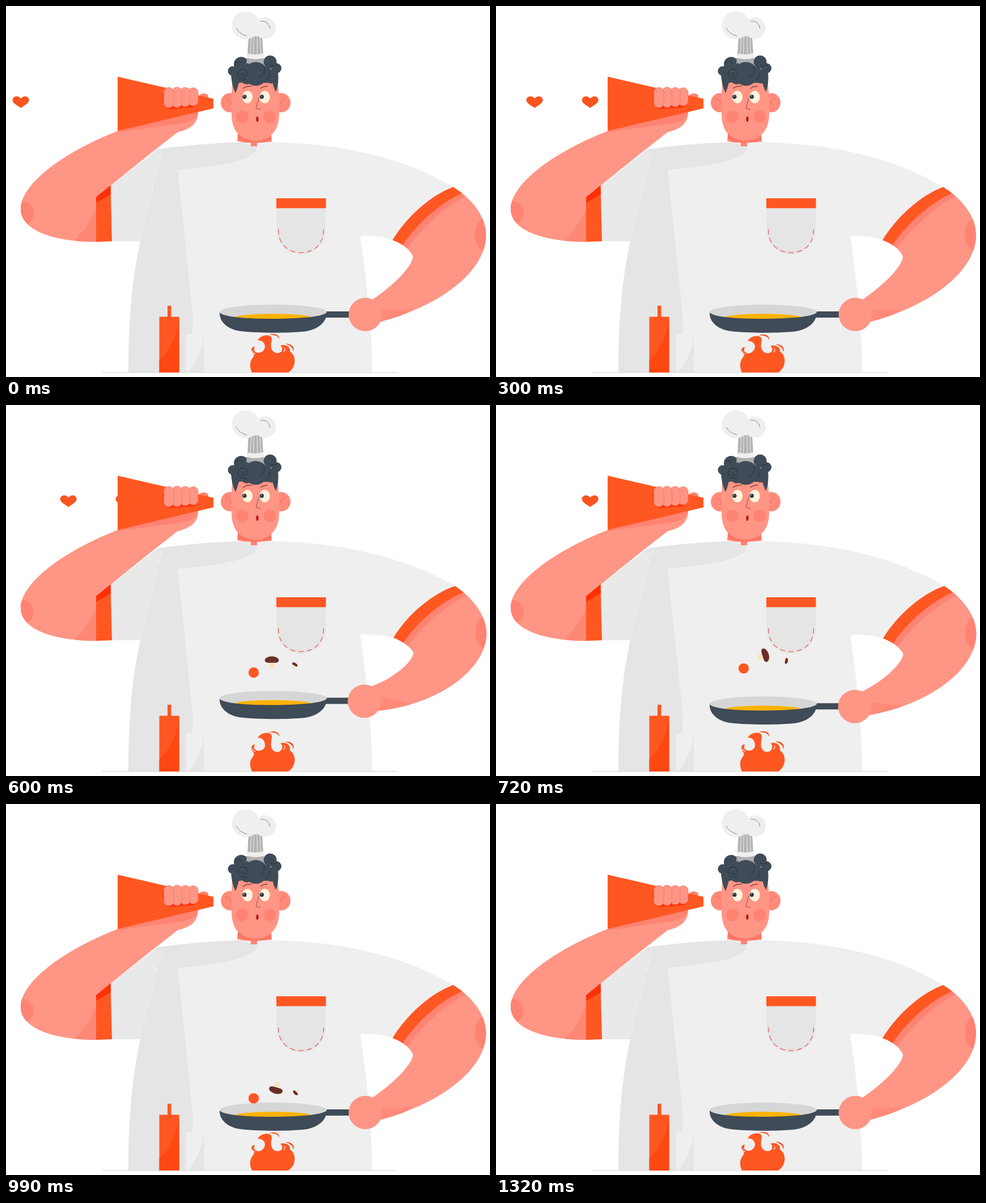
These frames come from a looping animation (854 px wide and 656 px high, 1350 ms). An HTML page with a canvas:

```html
<!DOCTYPE html>
<html lang="en">
<head>
<meta charset="utf-8">
<title>Cooking chef</title>
<style>
html, body { margin: 0; width: 100%; height: 100%; overflow: hidden; background: #fff; }
canvas { display: block; width: 854px; height: 656px; }
</style>
</head>
<body>
<canvas id="stage" width="854" height="656"></canvas>
<script>
const ctx = document.getElementById('stage').getContext('2d');
const LOOP = 1350, STEP = 30;
const ORANGE = '#ff5722', COAT = '#efefef', SHADE = '#e5e5e5', DARK = '#3f4b57';
const SKIN = '#ff9585', SKIN_SHADE = '#ff8373', EAR = '#ff8a79';

function fill(color, d) {
  ctx.fillStyle = color;
  ctx.fill(new Path2D(d));
}
function line(color, width, d, dash = []) {
  ctx.strokeStyle = color;
  ctx.lineWidth = width;
  ctx.setLineDash(dash);
  ctx.stroke(new Path2D(d));
  ctx.setLineDash([]);
}
function oval(color, x, y, rx, ry = rx) {
  ctx.fillStyle = color;
  ctx.beginPath();
  ctx.ellipse(x, y, rx, ry, 0, 0, Math.PI * 2);
  ctx.fill();
}
function box(color, x, y, w, h) {
  ctx.fillStyle = color;
  ctx.fillRect(x, y, w, h);
}
function clipped(d, draw) {
  ctx.save();
  ctx.clip(new Path2D(d));
  draw();
  ctx.restore();
}

const ease = u => (1 - Math.cos(Math.PI * Math.min(1, Math.max(0, u)))) / 2;

// Cubic curve through [time, value, slope] keys.
function follow(keys, t) {
  let i = 0;
  while (i < keys.length - 2 && t > keys[i + 1][0]) i++;
  const [t0, a, ma] = keys[i], [t1, b, mb] = keys[i + 1];
  const d = t1 - t0, u = Math.min(1, Math.max(0, (t - t0) / d)), v = 1 - u;
  return v * v * (1 + 2 * u) * a + u * u * (3 - 2 * u) * b + u * v * d * (v * ma - u * mb);
}
const TOSS = [[330, 590, -.3], [450, 533, -.55], [600, 473, -.17], [870, 487, .226], [1110, 557, .28], [1320, 595, 0]];
const SPIN = [[330, -240, 1.2], [450, -90, 1.3], [600, 90, .8], [870, 225, .45], [1110, 350, .53], [1320, 460, .5]];

function drawCoat(p) {
  fill(COAT, `M184 318 L268 253 C315 246 365 242 410 241 L468 241
    C588 242 703 268 ${789 + 4 * p} 320 L${682 + 2 * p} ${414 - 3 * p}
    C665 ${407 - p} 645 ${406 - p} 625 ${407 - p}
    C637 490 646 570 646 648 L216 648 C216 560 222 485 237 416 L187 416 Z`);
  fill('#e9e9e9', 'M184 318 L268 253 L276 253 L237 416 L187 416 Z');
  fill(SHADE, `M275 253 C320 246 365 243 410 241 L443 248 C443 275 375 282 303 290
    L331 562 L329 562 L329 580 L318 580 L318 648 L216 648 C216 560 222 485 237 416 Z`);
  fill(SHADE, 'M268 253 L276 252 L274 260 L262 259 Z');
  fill(SHADE, 'M349 583 C345 612 334 635 320 648 L349 648 Z');
  line('#f6f6f6', 1, 'M275 258 Q262 310 250 360 M600 262 Q613 335 624 404', [9, 7]);

  box('#e5e5e5', 477.5, 357, 86.5, 40);
  oval('#e5e5e5', 520.75, 396, 43.25, 43.5);
  box(ORANGE, 477, 340, 87.5, 17.5);
  line('#f0443a', 1.1, 'M480.5 395 C480.5 422 498 436 520.5 436 S560.5 422 560.5 395', [9, 6]);
}

function drawHead() {
  // hat
  fill('#b3b3b3', 'M428 52 L452 52 L454 88 L426 88 Z');
  line('#e4e4e4', 1.2, 'M433 54 L431 86 M437.5 54 L436.5 86 M443 54 L443.5 86 M448 54 L449.5 86');
  oval(COAT, 423, 34, 24.5);
  oval(COAT, 457, 39, 19);
  oval(COAT, 440, 44, 12, 10);
  line('#858585', 1, 'M406 39 Q411 49 425 53 M449 27 Q463 25 466 40');
  fill('#a9a9a9', 'M424 92 L455 92 L455 106 L424 106 Z');
  fill(COAT, 'M427 84 Q441 88 455 83 L456 92 Q441 97 426 92 Z');

  // neck
  fill(SKIN_SHADE, 'M410 215 L467 215 L469 240 L443 242 L443 248 L432 248 L432 242 Q419 242 408 239 Z');
  fill('#ff7262', 'M409 226 Q438 252 468 230 L468 236 Q440 247 409 235 Z');

  // ears and face
  oval(EAR, 395, 171, 16, 17);
  oval(EAR, 486, 171, 16, 17);
  line('#ef6658', 1, 'M387 164 Q396 164 397 174 M494 164 Q485 164 484 174');
  fill(SKIN, 'M400 120 L478 120 L482 160 L482 190 C482 224 463 237 440 237 C416 237 398 225 398 190 L398 155 Z');
  fill(DARK, 'M397 116 L414 116 Q412 137 405 154 Q397 138 397 116 M466 116 L480 116 Q482 138 476 152 Q470 140 466 116 Z');
  oval('#ff8373', 417, 196, 11);
  oval('#ff8373', 465, 196, 11);
  for (const x of [426, 456.5]) {
    oval('#fff3dc', x, 161, 9.2, 11);
    oval('#303b46', x - 5.2, 160.5, 3.7);
    oval('#ffffff', x - 6, 159, .8);
  }
  line('#6f3538', 1.2, 'M418 146 Q424 141 434 142 M449 146 Q455 141 462 142');
  line('#7c3d40', .8, 'M446 163 L441 181 L449 183');
  oval('#b71510', 443.5, 200, 2.1, 4.7);

  // curls
  oval(DARK, 415, 103, 13);
  oval(DARK, 400, 115, 8.5);
  oval(DARK, 411, 125, 11);
  oval(DARK, 425, 126, 12.5);
  oval(DARK, 441, 120, 21);
  oval(DARK, 458, 122, 14);
  oval(DARK, 468, 125, 12);
  oval(DARK, 477, 110, 9);
  oval(DARK, 466, 99, 11.5);
  line('#26313b', 1, `M425 130 Q412 130 409 120 Q412 108 423 113 Q430 121 421 125 Q414 122 419 118
    M455 105 Q459 121 447 126 M466 104 Q472 108 479 104 M404 100 Q412 96 417 101 M459 130 Q467 127 465 118`);
  // hat base between the curls
  fill('#b0b0b0', 'M425 92 Q440 96 455 92 L454 103 Q440 95 424 102 Z');
}

function drawLeftArm() {
  const arm = `M197 221 C98 260 25 316 26 360 C27 399 90 417 159 417 L159 339
    C215 292 262 255 303 223 C325 218 340 208 339 185 L300 165 Z`;
  fill(SKIN, arm);
  clipped(arm, () => {
    oval(SKIN_SHADE, 26, 366, 23, 22);
    fill('#ff8775', 'M159 358 C150 380 135 402 117 418 L159 418 Z');
    fill(SKIN_SHADE, 'M197 221 L339 186 C338 200 326 206 300 209 C270 213 230 218 200 223 Z');
  });
  fill(ORANGE, 'M159 339 L184.5 318 L187 416 L159 417 Z');
  fill('#ff2f06', 'M159 338 L184.5 317 L185 333 L159 348 Z');
}

function drawHorn() {
  oval(SKIN_SHADE, 349, 160, 8, 5.5);
  fill(ORANGE, 'M197 125 L366 164 L366 181 L197 221 Z');
  fill('#ff3208', 'M277 155 C275 177 283 184 293 182 L330 179 Q341 177 339 158 Z');
  for (const [x, y, h] of [[331, 160.5, 16], [317, 161, 17], [302.5, 161.5, 18], [288, 162, 18]]) {
    ctx.beginPath();
    ctx.roundRect(x - 9.5, y - h, 17.5, 2 * h, 8.7);
    ctx.fillStyle = SKIN;
    ctx.fill();
    ctx.strokeStyle = '#ff6f5c';
    ctx.lineWidth = .8;
    ctx.stroke();
  }
}

function heart(x) {
  ctx.save();
  ctx.translate(x, 170);
  fill('#f9541f', 'M.3 10.4 C-5 6 -14 3 -14.5 -3.5 C-14 -11.5 -4 -12.5 .3 -6.5 C5 -12.5 14 -11.5 14.7 -3.5 C14 3 5 6 .3 10.4 Z');
  ctx.restore();
}
function drawHearts(t) {
  for (const start of [0, 210, 420]) {
    const x = 26 + (t - start) * 14 / STEP;
    if (x >= 26 && x < 260) heart(x);
  }
}

function drawRightArm(p) {
  const fx = 634 - 2 * p, fy = 545.5 - 27.2 * p;
  const ex = 847 + p, ey = 405 - 2 * p;
  const cx = 4 * p, cy = -3 * p;
  const sleeveEdge = `C${708 + cx / 2} ${371 + cy} ${751 + cx} ${334 + cy / 2} ${789 + cx} 320`;
  const arm = `M${789 + cx} 320 C830 ${346 - p} ${ex} 378 ${ex} ${ey}
    C${ex} ${470 - 4 * p} ${764 + p} ${532 - 3 * p} ${fx + 22} ${fy + 14 + 4 * p}
    L${fx + 12} ${fy - 26} C${690 + p} ${490 - 12 * p} ${718 + p} ${457 - 8 * p} ${718 + p} ${443 - 6 * p}
    C${714 + p} ${432 - 4 * p} 700 ${420 + cy} ${682 + cx / 2} ${414 + cy} ${sleeveEdge} Z`;
  fill(SKIN, arm);
  clipped(arm, () => {
    oval(SKIN_SHADE, ex + 1, ey - 1, 21, 30);
    fill('#ff8a79', `M${fx + 24} ${fy - 10} Q${fx + 44} ${fy - 5} ${fx + 85} ${fy - 11 + 20 * p} L${fx + 25} ${fy + 28} Z`);
    line(SKIN_SHADE, 17, `M${809 + cx} 328 C${772 + cx} ${346 + cy / 2} ${732 + cx / 2} ${382 + cy} ${700 + cx / 2} ${424 + cy}`);
    fill(ORANGE, `M${789 + cx} 320 L${805 + cx} 331 C${768 + cx} ${347 + cy / 2} ${726 + cx / 2} ${383 + cy} ${699 + cx / 2} ${424 + cy}
      L${682 + cx / 2} ${414 + cy} ${sleeveEdge} Z`);
  });
  oval(SKIN, fx, fy, 29.5);
}

function mushroom(x, y, degrees, scale) {
  ctx.save();
  ctx.translate(x, y);
  ctx.rotate((degrees - 90) * Math.PI / 180);
  ctx.scale(scale, scale);
  box('#fbe3b8', -8, 0, 8.5, 10.5);
  fill('#6b2e27', 'M-16.3 -3 C-16 -7 -10 -9.7 -4 -9.7 C2 -9.7 8 -7 8.3 -3 Q8 1.5 2 1.5 L-10 1.5 Q-16 1.5 -16.3 -3 Z');
  ctx.restore();
}
function drawFood(t) {
  if (t < 390 || t > 1200) return;
  const y = follow(TOSS, t), spin = follow(SPIN, t);
  oval(ORANGE, 437, y, 9.2);
  mushroom(473, y - 18.8, spin, 1);
  mushroom(510.5, y - 12, spin + 30, .44);
}

function drawPan(t, p) {
  const lift = -28 * p;
  ctx.save();
  ctx.translate(0, lift);
  box(DARK, 560, 540, 50, 11);
  oval('#d6d6d6', 471.5, 541, 94.5, 13);
  oval('#ffb300', 471, 551, 68, 6.8);
  ctx.restore();

  clipped(`M0 0 H854 V${565 + lift} H0 Z`, () => drawFood(t));

  ctx.save();
  ctx.translate(0, lift);
  fill(DARK, `M377 542 C376 560 394 573 415 575 C448 578.5 495 578.5 527 575.5
    C552 572 566 558 566 542 C560 549 520 553 471.5 553 C422 553 384 550 377 542 Z`);
  ctx.restore();
}

function drawFlame(t) {
  const a = 2 * Math.PI * (t - 675) / LOOP;
  const d = -1.5 * Math.cos(a) - 1.2 * Math.cos(2 * a);
  const h = d * .8;
  fill(ORANGE, `M434 648 C429 637 430 628 436 621 C441 615 433 614 433 ${608 + h}
    C433 ${604 + h} 436 ${602 + h} 439 ${602 + h} C436 ${609 + h} 439 ${612 + h} 444 ${613 + h}
    C451 ${614 + h} 457 608 457 602 C457 ${596 + d} 452 ${590 + d} 444 ${591 + d}
    C449 ${582 + d} 461 ${580 + d} 467 ${584 + d} C472 ${588 + d} 465 598 469 607
    C472 615 484 616 487 ${609 + h} C488 ${605 + h} 487 ${602 + h} 484 ${600 + h}
    C494 ${597 + h} 503 ${603 + h} 501 611 C510 616 512 630 506 640 Q503 645 498 648 Z`);
  fill(ORANGE, `M464 ${581 + d} C474 ${577 + d} 483 ${581 + d} 482 ${589 + d} C480 ${583 + d} 474 ${581 + d} 464 ${581 + d} Z`);
  fill(ORANGE, `M493 ${597 + h} C502 ${596 + h} 511 ${602 + h} 507 ${611 + h} C506 ${603 + h} 501 ${600 + h} 493 ${597 + h} Z`);
  line(COAT, 1.2, `M435 ${609 + h} Q435 ${615 + h} 440 ${614 + h} M489 ${611 + h} Q494 ${609 + h} 491 ${604 + h}`);
}

function drawTable() {
  line('#dedede', 1.5, 'M169 648 H690');
  box(ORANGE, 285, 530, 6.5, 22);
  box(ORANGE, 270.5, 549.5, 35, 98.5);
  fill('#ff4712', 'M305.5 551 C303 580 290 609 270.5 627 L270.5 648 L305.5 648 Z');
}

function draw(t) {
  const p = t < 450 ? ease((t - 300) / 150) : 1 - ease((t - 450) / 510);
  ctx.clearRect(0, 0, 854, 656);
  drawCoat(p);
  drawHead();
  drawHearts(t);
  drawLeftArm();
  drawHorn();
  drawTable();
  drawPan(t, p);
  drawRightArm(p);
  drawFlame(t);
}

const origin = performance.now();
function tick() {
  const t = (performance.now() - origin) % LOOP;
  draw(Math.floor(t / STEP) * STEP);
  requestAnimationFrame(tick);
}
tick();
</script>
</body>
</html>
```
